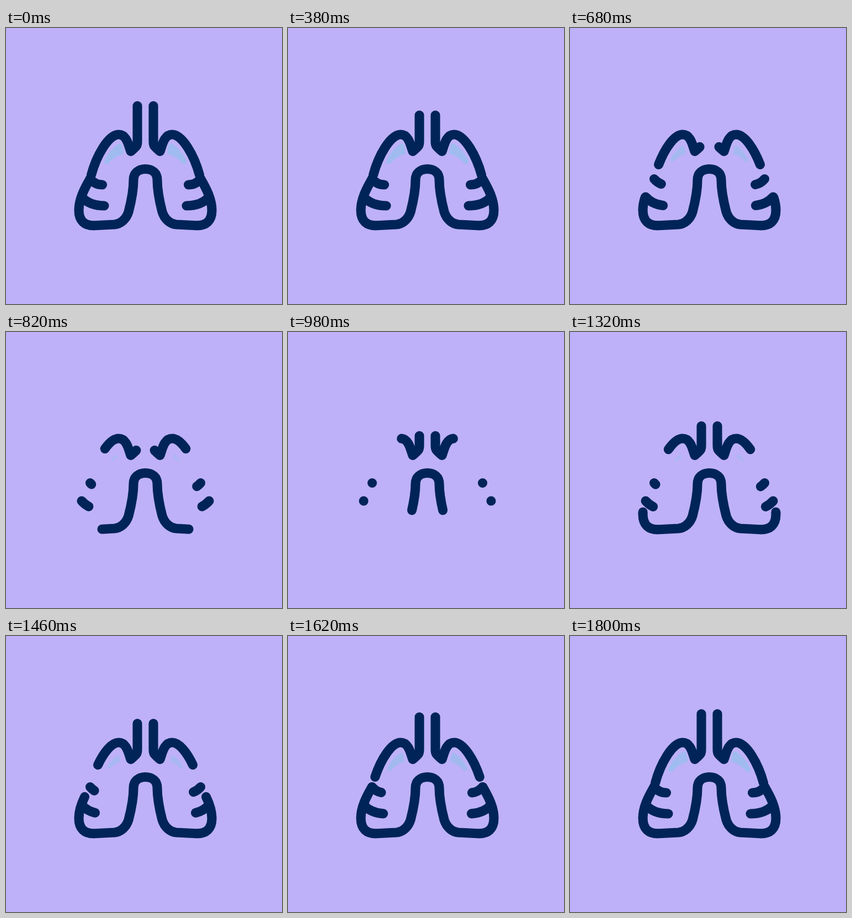
An HTML page with a canvas that plays this animation: 500x500 px, repeating every 2.42 s.

```html
<!DOCTYPE html>
<html lang="en">
<head>
<meta charset="utf-8">
<title>Lungs</title>
<style>
  html, body { margin: 0; height: 100%; overflow: hidden; background: #beb1f9; }
  canvas { display: block; width: 100vw; height: 100vh; }
</style>
</head>
<body>
<canvas width="500" height="500"></canvas>
<script>
const ctx = document.querySelector('canvas').getContext('2d');
const LOOP = 2420, ERASE = 220, DRAW = 980, DONE = 1800;

// Left half; the right half is its mirror image.
const airway = new Path2D('M238 141V205C238 214 237 214 226 223.5C222 213 219 193 204 193C185 193 163 233 154 268');
const lobe = new Path2D('M252.5 255.5C240 255.5 231 263 231 275C231 288 228 310 222 333C218 346 208 355 196 356L162 357.8C142 359 132 349 132 330C132 310 142 291 153 272');
const upperRib = new Path2D('M152.5 273.5C158 280 165 284 174.5 284');
const lowerRib = new Path2D('M137 306C146 316 158 322 178 322');
const shine = new Path2D('M206 209C196 214 183 228 178 242Q179 249 186 245C192 237 202 231 213 228L211 214Q209 209 206 209Z');

const progress = (t, from, to) => Math.min(1, Math.max(0, (t - from) / (to - from)));
const smooth = u => u * u * (3 - 2 * u);
const mix = (a, b, u) => a + (b - a) * u;

function pose(t) {
  const erased = smooth(progress(t, ERASE, DRAW)) ** 3.7;
  const u = progress(t, DRAW, DONE);
  const drawn = smooth(u);
  const lobeDrawn = 1 - (1 - u ** 1.3) ** 3;
  // The windpipe shrinks fully, springs back part way, then regrows.
  const shrink = 80 * smooth(progress(t, ERASE, 760));
  const rebound = 33 * smooth(progress(t, 760, DRAW));
  return {
    amount: 1 - erased + drawn,
    lobeEnd: mix(81, 274, 1 - erased + lobeDrawn),
    airwayStart: (shrink - rebound) * (1 - drawn)
  };
}

function trim(path, start, end) {
  ctx.setLineDash([Math.max(end - start, 0.05), 1000]);
  ctx.lineDashOffset = -start;
  ctx.stroke(path);
}

function drawShine(amount) {
  ctx.save();
  ctx.globalAlpha = amount ** 0.7;
  ctx.translate(196, 229);
  ctx.scale(amount, amount);
  ctx.translate(-196, -229);
  ctx.fill(shine);
  ctx.restore();
}

function drawSide({ amount, lobeEnd, airwayStart }, mirrored) {
  ctx.save();
  if (mirrored) ctx.transform(-1, 0, 0, 1, 505, 0);
  drawShine(amount);
  trim(airway, airwayStart, 126 + 94 * amount);
  trim(lobe, 0, lobeEnd);
  trim(upperRib, 0, 25.5 * (mirrored ? amount : amount ** 2));
  trim(lowerRib, 0, 46 * amount);
  ctx.restore();
}

function frame(t) {
  ctx.fillStyle = '#beb1f9';
  ctx.fillRect(0, 0, 500, 500);
  ctx.fillStyle = '#a0bbef';
  ctx.strokeStyle = '#002458';
  ctx.lineWidth = 17.1;
  ctx.lineCap = ctx.lineJoin = 'round';
  const state = pose(t);
  drawSide(state, false);
  drawSide(state, true);
}

const begin = performance.now();
function tick() {
  frame((performance.now() - begin) % LOOP);
  requestAnimationFrame(tick);
}
tick();
</script>
</body>
</html>
```
